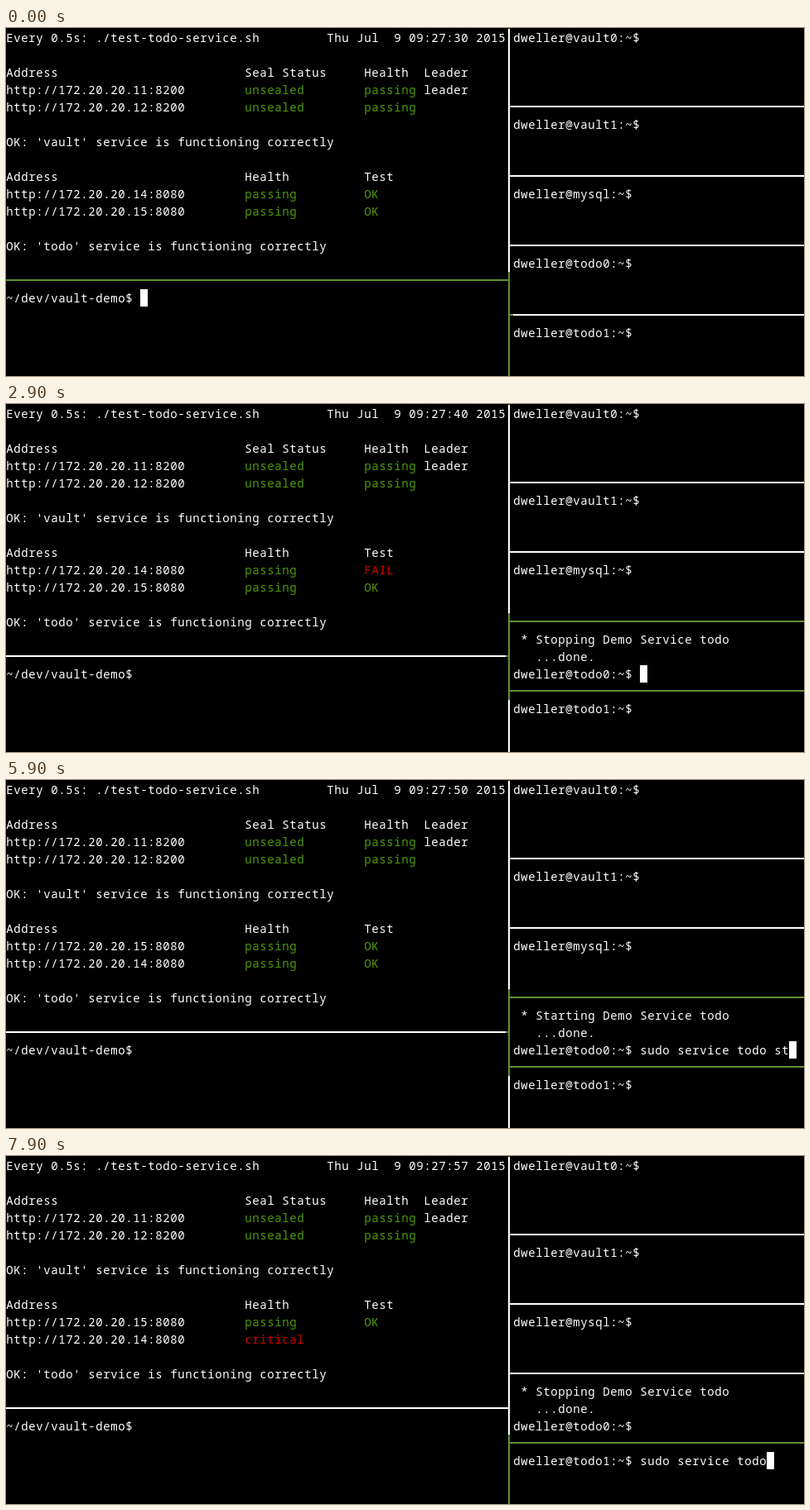
Recreate the animation shown at these times as an HTML page with a canvas. Size 963x421 px, loop 8000 ms.

```html
<!DOCTYPE html>
<html lang="en">
<head>
<meta charset="utf-8">
<title>Service failover demo</title>
<style>
html, body { margin: 0; width: 100%; height: 100%; overflow: hidden; background: #000; }
canvas { display: block; }
</style>
</head>
<body>
<canvas id="stage" width="963" height="421"></canvas>
<script>
const ctx = document.getElementById('stage').getContext('2d');
const LOOP = 8000, STEP = 100;
const CELL_W = 9, CELL_H = 21, TOP = 1;
const SPLIT = 67, RIGHT = 68, PANE_COLS = 39, PANE_ROWS = 3;
const WHITE = '#fff', GREEN = '#4e9a06', RED = '#cc0000', ACTIVE = '#5f9130';
const USER = 'dweller';

// Moments of the session, in ms
const TO_TODO0 = 500, TO_TODO1 = 6900;
const todo0Runs = [
  { type: 1000, typed: 1600, pause: 1900, end: 2100, enter: 2200, done: 2400, verb: 'stop', label: 'Stopping' },
  { type: 3950, typed: 4250, pause: 4250, end: 4400, enter: 4500, done: 4600, verb: 'start', label: 'Starting' },
  { type: 5550, typed: 5800, pause: 5800, end: 5950, enter: 6050, done: 6150, verb: 'stop', label: 'Stopping' }
];
const todo1Runs = [
  { type: 7200, typed: 7800, pause: 9000, end: 9200, enter: 9300, done: 9500, verb: 'stop', label: 'Stopping' }
];
const clockKnots = [[0, 30.1], [1700, 35.5], [2900, 40.1], [3900, 43.3], [5000, 46.6], [6700, 53.3], [7900, 57.3], [8000, 57.6]];

function put(col, row, text, color = WHITE) {
  ctx.fillStyle = color;
  [...text].forEach((ch, i) => {
    if (ch !== ' ') ctx.fillText(ch, (col + i) * CELL_W + 0.3, row * CELL_H + 17);
  });
}

function box(x, y, w, h, color) {
  ctx.fillStyle = color;
  ctx.fillRect(x, y, w, h);
}

function cursor(col, row) {
  box(col * CELL_W, row * CELL_H + TOP, CELL_W, CELL_H, WHITE);
}

function clock(t) {
  const i = clockKnots.findIndex(k => k[0] > t);
  const [t0, s0] = clockKnots[i - 1], [t1, s1] = clockKnots[i];
  return Math.floor(s0 + (s1 - s0) * (t - t0) / (t1 - t0));
}

function status(t) {
  const failing = ['passing', 'FAIL'], down = ['critical', ''], fine = ['passing', 'OK'];
  if (t < 2400) return fine;
  if (t < 3300) return failing;
  if (t < 5400) return down;
  if (t < 6300) return fine;
  return t < 7300 ? failing : down;
}

function drawWatch(t) {
  put(0, 0, 'Every 0.5s: ./test-todo-service.sh');
  put(43, 0, `Thu Jul  9 09:27:${clock(t)} 2015`);

  [[0, 'Address'], [32, 'Seal Status'], [48, 'Health'], [56, 'Leader']].forEach(([c, s]) => put(c, 2, s));
  [11, 12].forEach((ip, i) => {
    put(0, 3 + i, `http://172.20.20.${ip}:8200`);
    put(32, 3 + i, 'unsealed', GREEN);
    put(48, 3 + i, 'passing', GREEN);
  });
  put(56, 3, 'leader');
  put(0, 6, "OK: 'vault' service is functioning correctly");

  [[0, 'Address'], [32, 'Health'], [48, 'Test']].forEach(([c, s]) => put(c, 8, s));
  const nodes = [[14, ...status(t)], [15, 'passing', 'OK']];
  if (t >= 3300) nodes.reverse();
  nodes.forEach(([ip, health, test], i) => {
    put(0, 9 + i, `http://172.20.20.${ip}:8080`);
    put(32, 9 + i, health, health === 'passing' ? GREEN : RED);
    put(48, 9 + i, test, test === 'OK' ? GREEN : RED);
  });
  put(0, 12, "OK: 'todo' service is functioning correctly");
}

// Types the command, rests, then types the verb
function typedText(run, t) {
  const base = 'sudo service todo', tail = ' ' + run.verb;
  const part = (s, a, b) => s.slice(0, Math.round(s.length * Math.min(1, Math.max(0, (t - a) / (b - a)))));
  return part(base, run.type, run.typed) + part(tail, run.pause, run.end);
}

function blinkOn(since) {
  return since % 350 < 175;
}

function drawShell(row, host, runs, t, active, focusAt) {
  const prompt = `${USER}@${host}:~$ `;
  const lines = [''];
  let last = focusAt;
  const write = s => {
    for (const ch of s) {
      if (ch === '\n') { lines.push(''); continue; }
      lines[lines.length - 1] += ch;
      if (lines[lines.length - 1].length === PANE_COLS) lines.push('');
    }
  };
  write(prompt);
  for (const run of runs) {
    if (t < run.type) break;
    write(typedText(run, t));
    last = t < run.typed ? t : run.typed;
    if (t >= run.pause) last = Math.min(t, run.end);
    if (t < run.enter) break;
    write(`\n * ${run.label} Demo Service todo\n`);
    last = run.enter;
    if (t < run.done) break;
    write(`   ...done.\n${prompt}`);
    last = run.done;
  }
  const shown = lines.slice(-PANE_ROWS);
  shown.forEach((s, i) => put(RIGHT, row + i, s));
  if (active && blinkOn(t - last)) {
    cursor(RIGHT + shown[shown.length - 1].length, row + shown.length - 1);
  }
}

// Each border cell takes the active colour when it touches the focused pane
function drawBorders(focus) {
  const [from, to] = { shell: [14, 20], todo0: [12, 16], todo1: [16, 20] }[focus];
  const hot = r => r >= from && r <= to ? ACTIVE : WHITE;
  const mid = r => r * CELL_H + 10;
  const joint = SPLIT * CELL_W, centre = joint + 3;

  for (let r = 0; r < 20; r++) box(centre, r * CELL_H + TOP, 2, CELL_H, hot(r));
  box(0, mid(14), joint, 2, focus === 'shell' ? ACTIVE : WHITE);
  box(joint, mid(14), 4, 2, hot(14));
  for (const r of [4, 8, 12, 16]) {
    box(centre, mid(r), 6, 2, hot(r));
    box(RIGHT * CELL_W, mid(r), 351, 2, focus === 'shell' ? WHITE : hot(r));
  }
}

function draw(t) {
  const focus = t < TO_TODO0 ? 'shell' : t < TO_TODO1 ? 'todo0' : 'todo1';
  box(0, 0, 963, 421, '#000');
  ctx.font = '14px "Noto Sans Mono", "DejaVu Sans Mono", monospace';
  ctx.textBaseline = 'alphabetic';

  drawWatch(t);
  put(0, 15, '~/dev/vault-demo$');
  if (focus === 'shell' && blinkOn(t)) cursor(18, 15);
  [['vault0', 0], ['vault1', 5], ['mysql', 9]].forEach(([host, row]) => put(RIGHT, row, `${USER}@${host}:~$`));
  drawShell(13, 'todo0', todo0Runs, t, focus === 'todo0', TO_TODO0);
  drawShell(17, 'todo1', todo1Runs, t, focus === 'todo1', TO_TODO1);
  drawBorders(focus);
}

function frame() {
  draw(Math.floor(performance.now() % LOOP / STEP) * STEP);
  requestAnimationFrame(frame);
}
frame();
</script>
</body>
</html>
```
